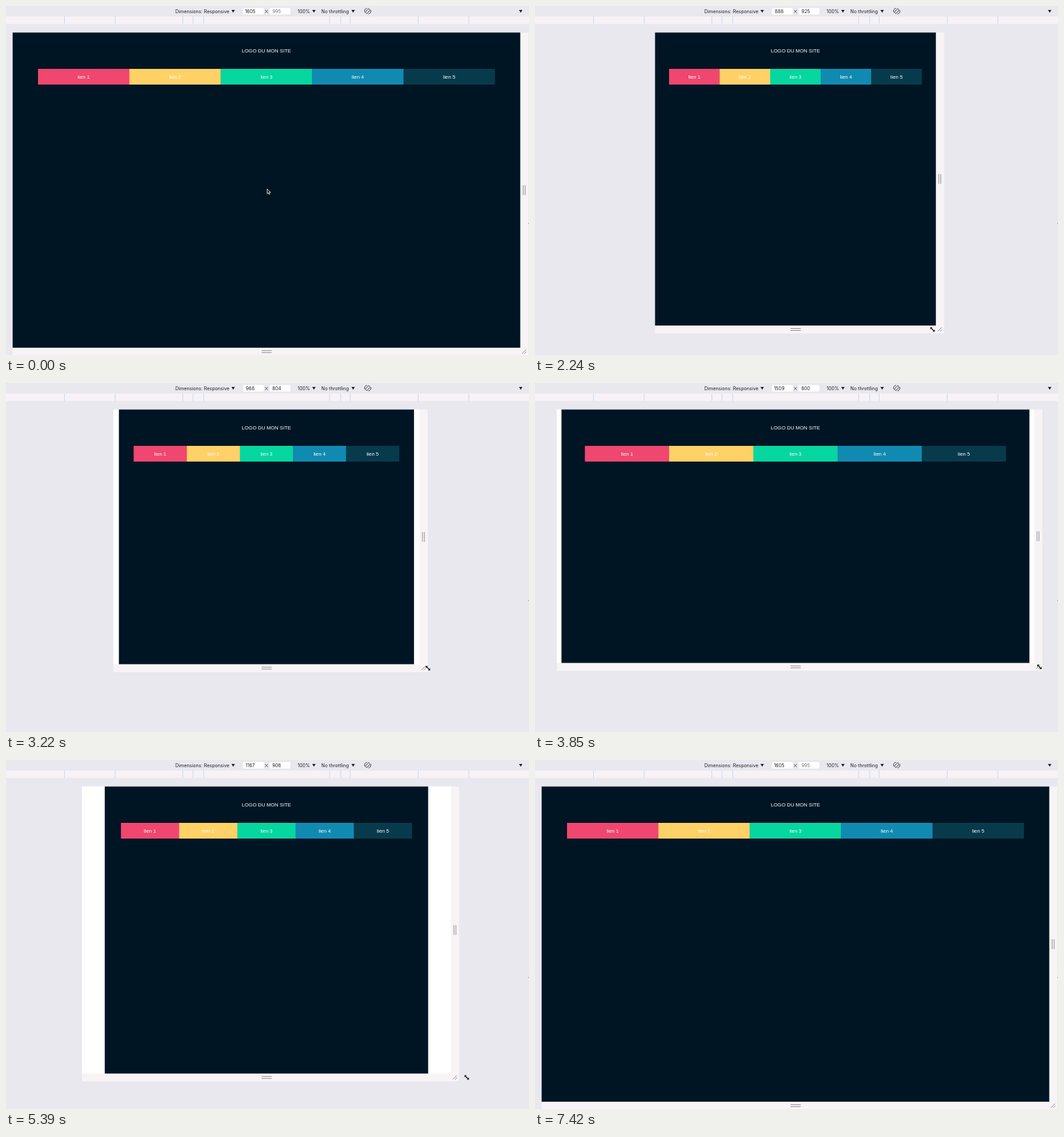
Recreate the animation shown at these times as an HTML page. Size 800 by 533 pixels, loop 7.98 s.

```html
<!DOCTYPE html>
<html lang="fr">
<head>
<meta charset="utf-8">
<title>Responsive navigation</title>
<style>
  html, body { margin: 0; width: 100%; height: 100%; overflow: hidden; background: #e8e8ee; }
  svg { display: block; width: 800px; height: 533px; }
  .bar text { font: 7.2px Inter, sans-serif; fill: #202124; }
  .bar .num { text-anchor: middle; }
  .page text { font: 7.74px "Liberation Sans", Arial, sans-serif; fill: #fff; text-anchor: middle; }
  .grip { stroke: #8d8c91; stroke-width: 1; fill: none; }
</style>
</head>
<body>
<svg viewBox="0 0 800 533" xmlns="http://www.w3.org/2000/svg">
  <rect width="800" height="533" fill="#e8e8ee"/>
  <rect y="16" width="800" height="11.5" fill="#f6f2f5"/>
  <g id="ticks"></g>

  <g class="bar">
    <text x="259" y="10.5">Dimensions: Responsive</text>
    <rect x="362.5" y="3" width="32" height="10" rx="2" fill="#fff"/>
    <rect x="403" y="3" width="32" height="10" rx="2" fill="#fff"/>
    <text id="wNum" class="num" x="373.5" y="10.5"></text>
    <text id="hNum" class="num" x="414" y="10.5"></text>
    <path d="M396.3 6.2l4.2 4.4m0-4.4l-4.2 4.4" stroke="#333" stroke-width=".8"/>
    <text x="446" y="10.5">100%</text>
    <text x="482.3" y="10.5">No throttling</text>
    <g id="arrows" fill="#222"></g>
    <g transform="translate(553.3 7.8) rotate(40)" fill="none" stroke="#333" stroke-width=".9">
      <rect x="-1.7" y="-3.8" width="3.4" height="7.6" rx=".8"/>
      <path d="M-3.8 -2.6A4.8 4.8 0 0 0 -2.6 4.2M3.8 2.6A4.8 4.8 0 0 0 2.6 -4.2"/>
    </g>
  </g>

  <rect id="strip" y="40.5" fill="#f8f4f6"/>
  <rect id="device" y="40.5" fill="#fff"/>
  <g class="page">
    <rect id="page" y="40.5" fill="#001524"/>
    <text x="398.4" y="71">LOGO DU MON SITE</text>
    <g id="nav"></g>
  </g>
  <path id="sideGrip" class="grip" d="M4.5 -7.5v15M7.5 -7.5v15"/>
  <path id="footGrip" class="grip" d="M391 4.5h15.5M391 7.5h15.5"/>
  <path id="cornerGrip" class="grip" d="M2.8 9l6.2-6.2M6.2 9.2l3-3"/>
  <rect x="799" y="331.5" width="1" height="1.5" fill="#999"/>

  <path id="pointer" d="M0 0v7.2l1.7-1.5 1.1 2.6 1.3-.6-1.1-2.5h2.3z" fill="#111" stroke="#fff" stroke-width=".8"/>
  <g id="resizer">
    <path d="M-2.4 -2.4L2.4 2.4" stroke="#000" stroke-width="1.3"/>
    <path d="M-3.5 -3.5h3.7l-3.7 3.7zM3.5 3.5h-3.7l3.7-3.7z" fill="#000" stroke="#fff" stroke-width=".3"/>
  </g>
</svg>

<script>
const LOOP = 7980, STEP = 70;
const SCALE = 776.5 / 1605, MID = 398.4, TOP = 40.5;
const DRAG_START = 1680, DRAG_END = 5740;

// [time in ms, value in CSS pixels]
const widthKeys = [
  [1680, 1605], [2240, 888], [2590, 555], [3150, 933], [3220, 968],
  [3850, 1509], [3990, 1532], [4830, 474], [4900, 440], [5740, 1605]
];
const heightKeys = [
  [1680, 995], [2240, 925], [2800, 810], [3220, 804], [3850, 800],
  [4830, 792], [5000, 795], [5740, 995]
];
// pointer path before the drag, leaving and re-entering at the right edge
const pointerX = [[0, 399.5], [350, 806], [1050, 806], [1470, 792.5]];
const pointerY = [[0, 279.5], [350, 522], [1050, 522], [1470, 528]];

const $ = id => document.getElementById(id);
const set = (el, attrs) => { for (const k in attrs) el.setAttribute(k, attrs[k]); };
const move = (el, x, y) => set(el, { transform: `translate(${x} ${y})` });
const show = (el, on) => { el.style.display = on ? '' : 'none'; };
const add = (parent, tag, attrs) => {
  const el = document.createElementNS('http://www.w3.org/2000/svg', tag);
  set(el, attrs);
  return parent.appendChild(el);
};

// monotone cubic interpolation: no overshoot, flat at the turning points
function curve(keys) {
  const slope = keys.slice(1).map(([t, v], i) => (v - keys[i][1]) / (t - keys[i][0]));
  const tangent = keys.map((_, i) => {
    const a = slope[i - 1], b = slope[i];
    return a * b > 0 ? 2 * a * b / (a + b) : 0;
  });
  return t => {
    const last = keys.length - 1;
    if (t <= keys[0][0]) return keys[0][1];
    if (t >= keys[last][0]) return keys[last][1];
    const i = keys.findIndex(k => k[0] > t) - 1;
    const [t0, v0] = keys[i], [t1, v1] = keys[i + 1];
    const d = t1 - t0, u = (t - t0) / d, w = 1 - u;
    return v0 * (1 + 2 * u) * w * w + tangent[i] * d * u * w * w
      + v1 * u * u * (3 - 2 * u) - tangent[i + 1] * d * u * u * w;
  };
}
const widthAt = curve(widthKeys), heightAt = curve(heightKeys);
const xAt = curve(pointerX), yAt = curve(pointerY);

for (const x of [89, 166.5, 270, 285.5, 302, 494.5, 511.5, 526, 630, 707.5])
  add($('ticks'), 'rect', { x, y: 16, width: 1, height: 11.5, fill: '#c5daf5' });
for (const x of [347.5, 471, 531, 787.3])
  add($('arrows'), 'path', { d: `M${x - 2.6} 6h5.2l-2.6 4.2z` });

const links = ['#ef476f', '#ffd166', '#06d6a0', '#118ab2', '#073b4c'].map((fill, i) => {
  const box = add($('nav'), 'rect', { y: 96, height: 24, fill });
  const label = add($('nav'), 'text', { y: 110.6 });
  label.textContent = `lien ${i + 1}`;
  return { box, label };
});

function draw(t) {
  const cssW = widthAt(t), cssH = heightAt(t);
  const w = cssW * SCALE, h = cssH * SCALE;
  const left = MID - w / 2, right = MID + w / 2, bottom = TOP + h;
  const dragging = t > DRAG_START && t < DRAG_END;

  $('wNum').textContent = Math.round(cssW);
  $('hNum').textContent = Math.round(cssH);
  $('hNum').style.fill = dragging ? '' : '#77777c';

  set($('strip'), { x: left, width: w + 12.5, height: h + 12 });
  set($('device'), { x: left, width: w, height: h });

  // the page is laid out one step late while the viewport grows
  const pageW = Math.min(w, widthAt(t - STEP) * SCALE);
  set($('page'), { x: MID - pageW / 2, width: pageW, height: h });
  const cell = pageW * 0.9 / links.length;
  links.forEach(({ box, label }, i) => {
    const x = MID + (i - 2.5) * cell;
    set(box, { x, width: cell + (i < 4 ? 0.3 : 0) });
    set(label, { x: x + cell / 2 });
  });

  move($('sideGrip'), right, TOP + h / 2);
  move($('footGrip'), 0, bottom);
  move($('cornerGrip'), right, bottom);

  const held = t >= 1470 && t <= DRAG_END;
  const lead = (widthAt(t + STEP) - cssW) * SCALE * 0.275;
  show($('pointer'), t < 1470);
  show($('resizer'), held);
  move($('pointer'), xAt(t), yAt(t));
  move($('resizer'), right + 6 + lead, bottom + 6);
}

const start = performance.now();
function tick() {
  const t = (performance.now() - start) % LOOP;
  draw(Math.floor(t / STEP) * STEP);
  requestAnimationFrame(tick);
}
draw(0);
requestAnimationFrame(tick);
</script>
</body>
</html>
```
